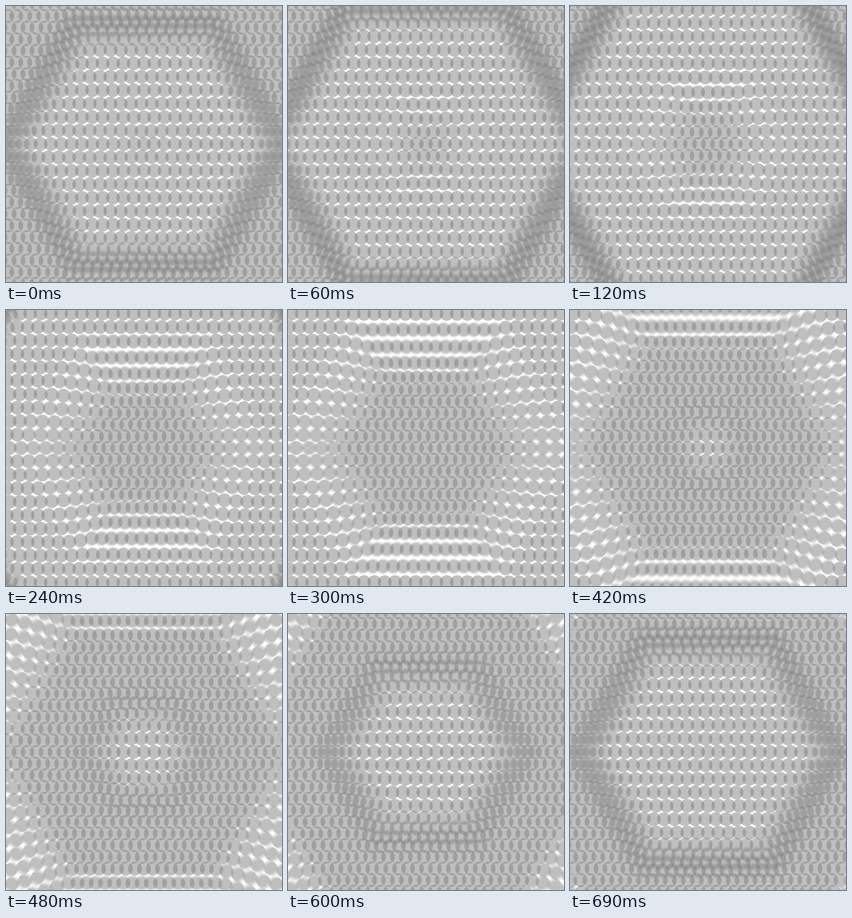
An HTML page with a canvas that plays this animation: 500 by 500 pixels, repeating every 720 ms.

```html
<!DOCTYPE html>
<html lang="en">
<head>
<meta charset="utf-8">
<title>Hexagonal wave of discs</title>
<style>
html, body { margin: 0; width: 100%; height: 100%; overflow: hidden; background: #fff; }
canvas { display: block; width: 500px; height: 500px; }
</style>
</head>
<body>
<canvas id="stage" width="500" height="500"></canvas>
<script>
const SIZE = 500, MID = SIZE / 2;
const FRAMES = 24, STEP = 30;          // ms per step
const SAMPLES = 8;                     // motion blur
const RING = 24.35, ROW = RING * Math.sqrt(3) / 2, PITCH = RING * 2 / 3;
const RADIUS = 12.5;
const SPREAD = 2 / Math.sqrt(3) - 1;
const RINGS = 18;                      // rings crossed by a front in one loop

const mod = (a, n) => ((a % n) + n) % n;
const smooth = x => {
  x = Math.min(1, Math.max(0, x));
  return x * x * (3 - 2 * x);
};

const dots = [];
for (let j = -13; j <= 13; j++) {
  for (let i = -18; i <= 18; i++) {
    const x = i * PITCH - (j % 2 ? PITCH / 4 : 0);
    const y = j * ROW;
    const ax = Math.abs(x), ay = Math.abs(y);
    const ring = Math.max(ay, ay / 2 + ax * Math.sqrt(3) / 2) / ROW;
    dots.push({ x, y, ring });
  }
}

function scaleAt(ring, ms) {
  const u = ms / (FRAMES * STEP) * RINGS - 0.1 - ring;
  const w = Math.abs(mod(u + RINGS / 4, RINGS) - RINGS / 2);
  return 1 + SPREAD * smooth((w - 2) / 5);
}

function makeCanvas() {
  const c = document.createElement('canvas');
  c.width = c.height = SIZE;
  return c;
}

const layer = makeCanvas();
const pen = layer.getContext('2d');

function drawDots(ms) {
  pen.fillStyle = '#fff';
  pen.fillRect(0, 0, SIZE, SIZE);
  pen.fillStyle = 'rgba(128,128,128,0.5)';
  for (const d of dots) {
    const s = scaleAt(d.ring, ms);
    const x = MID + d.x * s, y = MID + d.y * s;
    if (Math.max(Math.abs(x - MID), Math.abs(y - MID)) > MID + RADIUS) continue;
    pen.beginPath();
    pen.arc(x, y, RADIUS, 0, Math.PI * 2);
    pen.fill();
  }
}

const cache = [];

function frameImage(n) {
  if (!cache[n]) {
    const c = makeCanvas(), g = c.getContext('2d');
    for (let i = 0; i < SAMPLES; i++) {
      drawDots((n + (i + 0.5) / SAMPLES) * STEP);
      g.globalAlpha = 1 / (i + 1);
      g.drawImage(layer, 0, 0);
    }
    cache[n] = c;
  }
  return cache[n];
}

const stage = document.getElementById('stage').getContext('2d');
let start = null, shown = -1;

function tick(now) {
  if (start === null) start = now;
  const n = Math.floor(Math.max(0, now - start) / STEP) % FRAMES;
  if (n !== shown) {
    stage.drawImage(frameImage(n), 0, 0);
    shown = n;
  }
  requestAnimationFrame(tick);
}

stage.drawImage(frameImage(0), 0, 0);
requestAnimationFrame(tick);
</script>
</body>
</html>
```
